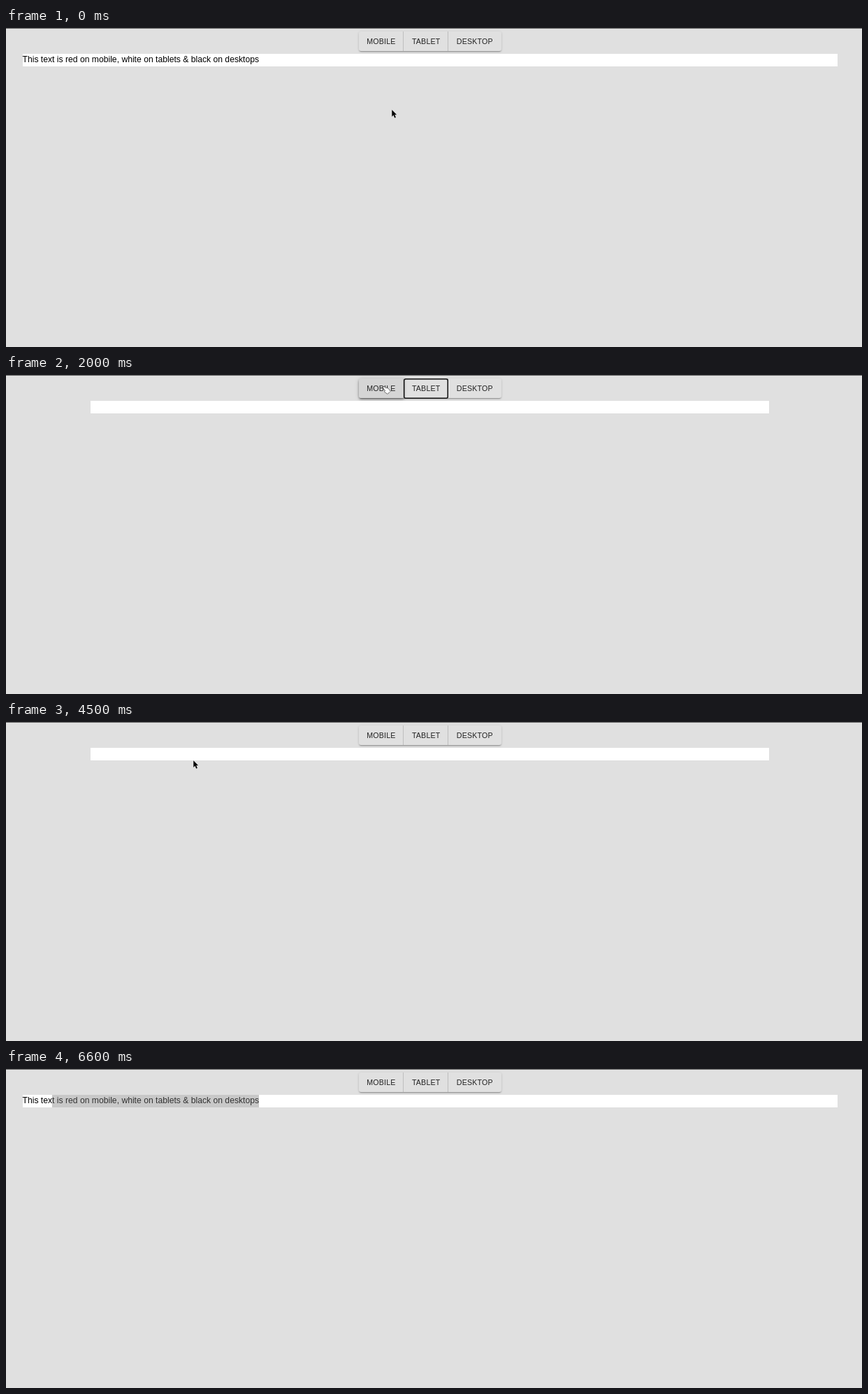
Animation, 1225 px wide and 457 px high, one loop 7.1 s. Source, as an HTML page:

```html
<!DOCTYPE html>
<html lang="en">
<head>
<meta charset="utf-8">
<title>Responsive text</title>
<style>
html, body { margin: 0; width: 100%; height: 100%; overflow: hidden; }
body { position: relative; background: #e0e0e0; font-family: "Liberation Sans", Arial, sans-serif; }
.edge { position: absolute; top: 0; left: 0; right: 0; height: 1px; background: #626262; }
.group {
  position: absolute; top: 5px; left: 606.5px; height: 28px; display: flex;
  transform: translateX(-50%); border-radius: 3px; background: #e0e0e0;
  box-shadow: 0 2.3px .8px -1.5px #0003, 0 1.5px 1.5px #00000024, 0 .8px 3.8px #0000001f;
}
.button {
  --hover: 0;
  position: relative; box-sizing: border-box; padding: 0 11.7px;
  font-size: 10.64px; letter-spacing: .2px; line-height: 28px; color: #212121;
  background: rgb(213 213 213 / var(--hover));
  box-shadow: 0 1.5px 3px -.8px rgb(0 0 0 / calc(.2 * var(--hover))),
    0 3px 3.8px rgb(0 0 0 / calc(.14 * var(--hover))),
    0 .8px 7.6px rgb(0 0 0 / calc(.12 * var(--hover)));
}
.button:first-child { border-radius: 3px 0 0 3px; }
.button:last-child { border-radius: 0 3px 3px 0; }
.button:not(:last-child) { border-right: 1px solid #bdbdbd; padding-right: 10.7px; }
.button.focused { z-index: 1; }
.button.focused::after {
  content: ""; position: absolute; inset: -.5px -1px -.5px -.5px;
  border-radius: 3px; box-shadow: inset 0 0 0 1.5px #101010;
}
.bar {
  position: absolute; top: 37.3px; height: 18px; background: #fff;
  font-size: 12.16px; line-height: 16px; white-space: pre;
}
.bar span { display: inline-block; height: 18px; vertical-align: top; }
.selected { background: #3367d1; color: #fff; }
.inactive .selected { background: #c8c8c8; color: #323232; }
svg { position: absolute; left: 0; top: 0; overflow: visible; z-index: 2; }
path { display: none; }
</style>
</head>
<body>
<div class="edge"></div>
<div class="group">
  <div class="button">MOBILE</div><div class="button">TABLET</div><div class="button">DESKTOP</div>
</div>
<div class="bar"><span></span><span class="selected"></span></div>
<svg width="1" height="1">
  <path id="arrow" d="M.3 .2V9.9L2.5 7.8 4.2 11.7 5.9 11 4.2 7.2H7.1Z"/>
  <path id="hand" d="M.5 1.2Q.8 0 2 .6L4.6 2.6Q7.5 2 8.6 4L11.4 7.2 7 11.3 3 8.6Q1.8 7 3.6 6.6L.9 2.8Z"
    fill="#fff" stroke="#222" stroke-width=".8" stroke-dasharray="1.6 .5"/>
  <path id="beam" d="M-2-6.5Q0-6.5 0-5Q0-6.5 2-6.5M0-5V5M-2 6.5Q0 6.5 0 5Q0 6.5 2 6.5"
    fill="none" stroke="#222" stroke-width="1"/>
</svg>
<script>
const LOOP = 7100, STEP = 100;
const MESSAGE = "This text is red on mobile, white on tablets & black on desktops";
const LAYOUTS = {
  mobile: { left: 363.5, width: 486, color: "#e5393f" },
  tablet: { left: 121, width: 971.3, color: "#fff" },
  desktop: { left: 23.5, width: 1166, color: "#000" },
};
const EDGES = [504, 569, 633.5, 709];

// Pointer path: time, x, y
const PATH = [
  [0, 552, 117], [300, 606, 78], [600, 685, 27], [800, 691, 20],
  [900, 670, 19], [1000, 628, 18], [1200, 599, 19],
  [1600, 599, 19], [1800, 560, 17], [2000, 539, 16],
  [2600, 539, 16], [2800, 543, 24], [3000, 556, 58], [3200, 582, 46], [3300, 588, 33],
  [3400, 592, 29], [3600, 598, 24],
  [3700, 598, 24], [4000, 500, 42], [4300, 310, 54], [4500, 268, 55],
  [4600, 252, 58], [4800, 182, 62], [5000, 160, 57], [5100, 163, 47], [5300, 164.5, 41],
  [5400, 580, 15], [5500, 620, 16], [5700, 678, 20],
  [5800, 678, 20], [6200, 690, 6], [6500, 706, -13], [7100, 706, -13],
];

// Layout and focus changes: time, layout, focused button index
const CLICKS = [
  [0, "desktop", -1], [1400, "tablet", 1], [2700, "mobile", 0], [3800, "tablet", 1],
  [4500, "tablet", -1], [5900, "desktop", 2], [6600, "desktop", -1],
];
const SELECT_AT = 5100, BLUR_AT = 6600, SELECT_FROM = 8;

const buttons = [...document.querySelectorAll(".button")];
const bar = document.querySelector(".bar");
const [plain, selected] = bar.children;
const cursors = [...document.querySelectorAll("path")];

function pointerAt(t) {
  const i = Math.max(1, PATH.findIndex(point => point[0] >= t));
  const [t0, x0, y0] = PATH[i - 1], [t1, x1, y1] = PATH[i];
  const k = (Math.max(0, t) - t0) / (t1 - t0);
  return { x: x0 + (x1 - x0) * k, y: y0 + (y1 - y0) * k };
}

const isOver = ({ x, y }, i) => x >= EDGES[i] && x < EDGES[i + 1] && y >= 5 && y < 33;

// Hover eases in over the two preceding steps
const hoverAt = (t, i) =>
  [1, 2].filter(n => isOver(pointerAt(t - n * STEP), i)).length / 2;

function cursorKind(p, layout) {
  if (buttons.some((_, i) => isOver(p, i))) return "hand";
  const overBar = p.y > 37 && p.y < 55 && p.x > layout.left && p.x < layout.left + layout.width;
  return overBar ? "beam" : "arrow";
}

function draw(t) {
  const [, name, focus] = CLICKS.findLast(click => click[0] <= t);
  const layout = LAYOUTS[name];
  bar.style.left = layout.left + "px";
  bar.style.width = layout.width + "px";
  bar.style.color = layout.color;
  bar.classList.toggle("inactive", t >= BLUR_AT);

  const split = t >= SELECT_AT ? SELECT_FROM : MESSAGE.length;
  plain.textContent = MESSAGE.slice(0, split);
  selected.textContent = MESSAGE.slice(split);

  buttons.forEach((button, i) => {
    button.style.setProperty("--hover", hoverAt(t, i));
    button.classList.toggle("focused", i === focus);
  });

  const p = pointerAt(t), kind = cursorKind(p, layout);
  cursors.forEach(cursor => {
    cursor.style.display = cursor.id === kind ? "inline" : "none";
    cursor.setAttribute("transform", `translate(${p.x} ${p.y})`);
  });
}

const start = performance.now();
function tick() {
  const t = (performance.now() - start) % LOOP;
  draw(Math.floor(t / STEP) * STEP);
  requestAnimationFrame(tick);
}
tick();
</script>
</body>
</html>
```
